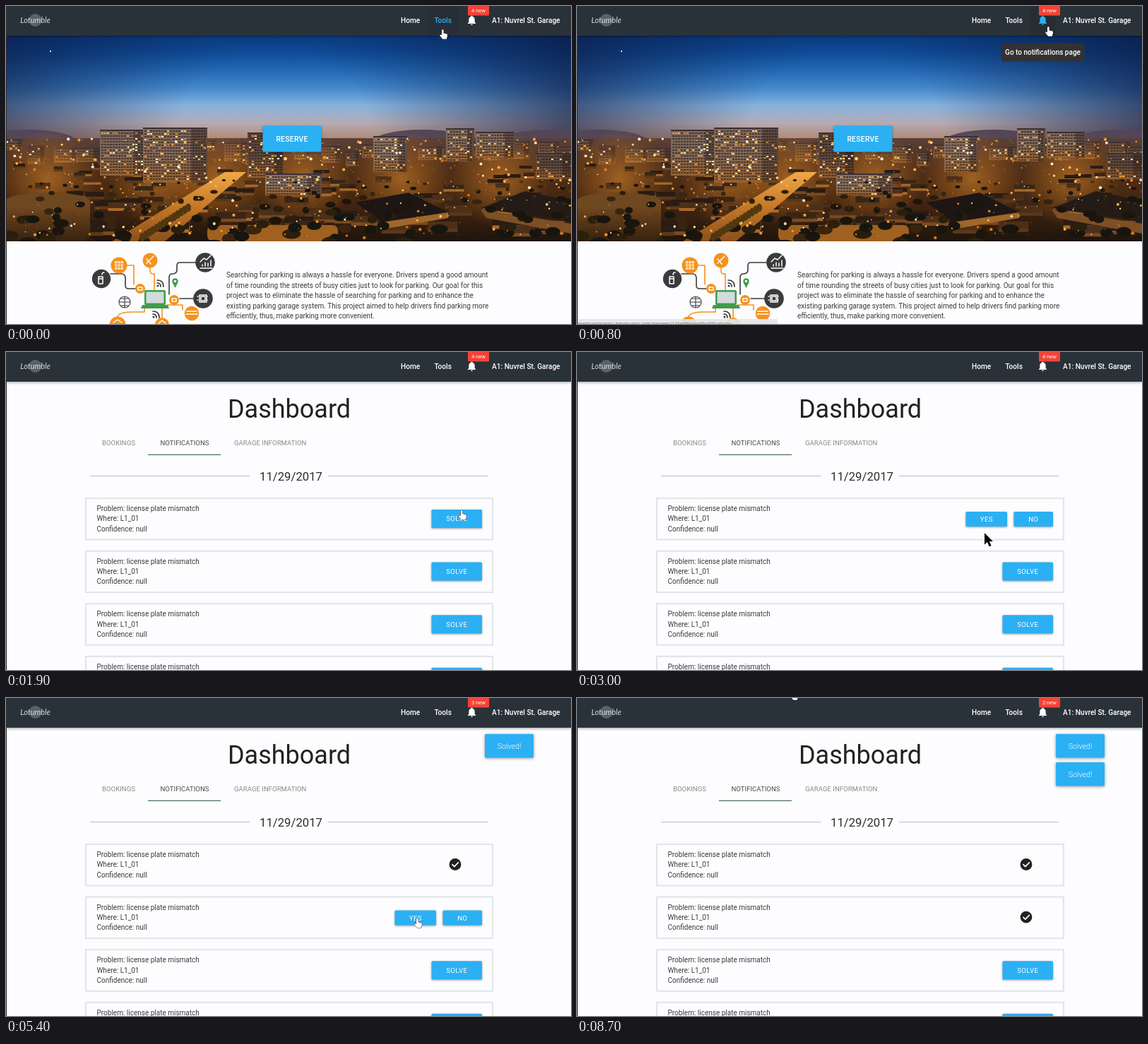
These frames come from a looping animation (800 by 450 pixels, 9.1 s). An HTML page with a canvas:

```html
<!DOCTYPE html>
<html lang="en">
<head>
<meta charset="utf-8">
<title>Parking dashboard</title>
<style>
  html, body { margin: 0; width: 100%; height: 100%; overflow: hidden; }
  canvas { display: block; }
</style>
</head>
<body>
<canvas id="stage" width="800" height="450"></canvas>
<script>
const LOOP = 9100, STEP = 100, PAGE_SWITCH = 1700;
const BLUE = '#2bb0f4', ORANGE = '#f5921e', DARK = '#3b3a3d', GREEN = '#3f9c4a';
const stage = document.getElementById('stage').getContext('2d');
let c = stage;

const clamp = v => Math.max(0, Math.min(1, v));
const ease = v => v * v * (3 - 2 * v);
const mix = (a, b, k) => a + (b - a) * k;

function rect(x, y, w, h, color, radius = 0) {
  c.fillStyle = color;
  c.beginPath();
  c.roundRect(x, y, w, h, radius);
  c.fill();
}

function disc(x, y, r, color, ry = r) {
  c.fillStyle = color;
  c.beginPath();
  c.ellipse(x, y, r, ry, 0, 0, 7);
  c.fill();
}

function poly(points, color) {
  c.fillStyle = color;
  c.fill(new Path2D('M' + points + 'Z'));
}

function stroke(path, color, width = 1.6) {
  c.strokeStyle = color;
  c.lineWidth = width;
  c.lineJoin = c.lineCap = 'round';
  c.stroke(new Path2D(path));
}

function text(s, x, y, size, color, { weight = 400, align = 'left', spacing = 0, family = 'Roboto' } = {}) {
  c.font = `${weight} ${size}px ${family}, sans-serif`;
  c.textAlign = align;
  c.letterSpacing = spacing + 'px';
  c.fillStyle = color;
  c.fillText(s, x, y);
}

function at(x, y, scale, draw) {
  c.save();
  c.translate(x, y);
  c.scale(scale, scale);
  draw();
  c.restore();
}

function shadow(blur, draw) {
  c.save();
  c.shadowColor = 'rgba(0,0,0,.4)';
  c.shadowBlur = blur;
  c.shadowOffsetY = 1;
  draw();
  c.restore();
}

function button(label, x, y, w, h, size = 9.7, weight = 400) {
  shadow(3, () => rect(x, y, w, h, BLUE, 1.5));
  text(label, x + w / 2, y + h / 2 + size * .36, size, '#fff', { align: 'center', spacing: .3, weight });
}

// Evenly spread colour stops
function blend(g, ...colors) {
  colors.forEach((color, i) => g.addColorStop(i / (colors.length - 1), color));
  return g;
}
const vertical = (top, bottom, ...colors) => blend(c.createLinearGradient(0, top, 0, bottom), ...colors);
const radial = (x, y, r0, r1, ...colors) => blend(c.createRadialGradient(x, y, r0, x, y, r1), ...colors);

// Evening skyline: gradients, plain blocks and seeded lights.
function paintCity() {
  let seed = 11;
  const rnd = (a = 0, b = 1) => mix(a, b, (seed = seed * 16807 % 2147483647) / 2147483647);
  const pick = list => list[Math.floor(rnd(0, list.length))];
  const warm = ['#ffd98a', '#ffb64a', '#f59a2c', '#fff0c8', '#d97a1c'];

  function tower(x, w, top, bottom, color) {
    rect(x, top, w, bottom - top, vertical(top, bottom, color, color, '#94602e'));
    rect(x + w * .75, top, w * .25, bottom - top, 'rgba(25,15,20,.35)');
    rect(x, top, w, 2, '#3a3038');
    for (let y = top + 4; y < bottom - 2; y += 4)
      for (let wx = x + 2; wx < x + w - 2; wx += 4)
        rect(wx, y, 3, 2, rnd() < .16 ? pick(warm) : 'rgba(40,28,28,.6)');
  }

  c.save();
  c.beginPath();
  c.rect(0, 42, 800, 291);
  c.clip();

  rect(0, 42, 800, 150, vertical(42, 190, '#0a3c82', '#0f4c98', '#2468b4', '#4488cc', '#86b2de', '#b4abb4', '#b08672'));
  rect(0, 42, 800, 150, radial(380, 200, 140, 500, 'rgba(12,24,62,0)', 'rgba(12,24,62,.85)'));
  rect(62, 63, 2, 2, '#cfe2f7');
  for (const x of [30, 590, 770]) disc(x, 192, 70, '#544659', 17);

  rect(0, 187, 800, 146, vertical(187, 333, '#5a4038', '#50301a', '#4a2a12', '#38200f', '#1e140c'));
  for (let i = 0; i < 24; i++) {
    const top = rnd(189, 206);
    tower(i * 34 + rnd(-6, 6), rnd(18, 36), top, top + rnd(14, 30), pick(['#4a3530', '#5e463a', '#6c4f3c']));
  }
  for (const x of [60, 215, 300, 420, 560, 700]) disc(x, 245, 70, radial(x, 245, 0, 70, 'rgba(255,160,50,.45)', 'rgba(255,140,30,0)'), 70);

  // Low blocks, nearer ones larger
  for (let i = 0; i < 90; i++) {
    const y = 222 + i, w = rnd(10, 20) + i * .35, h = 4 + i * .07, x = rnd(-20, 800);
    rect(x, y, w, h, pick(['#2a1c14', '#3a2616', '#4c2f18']));
    rect(x, y + h, w, 1 + h * .4, pick(['#a8682a', '#7a4a20', '#5c3818']));
  }
  poly('150 333 310 235 340 235 225 333', vertical(235, 333, '#f2a848', '#c57826', '#8a4f1c'));

  const landmarks = [[133, 64, 175, 240], [194, 91, 172, 250], [342, 50, 179, 243], [520, 48, 184, 235],
    [623, 40, 173, 220], [665, 54, 178, 215], [750, 50, 208, 245], [367, 80, 237, 268]];
  landmarks.forEach(([x, w, top, bottom], i) => tower(x, w, top, bottom, ['#7c685b', '#806858', '#5a463c', '#866f60'][i % 4]));

  rect(0, 276, 119, 57, vertical(276, 333, '#7a4c22', '#36220f'));
  disc(59, 276, 60, '#6d4820', 12);
  rect(285, 310, 185, 23, '#a0601f', 8);
  poly('495 278 570 264 626 292 532 306', '#1d1615');
  poly('532 306 626 292 626 300 532 316', '#a0662a');
  poly('672 286 735 262 800 276 800 306', '#241b17');
  poly('672 288 800 308 800 322 680 300', '#7e4f25');

  for (let i = 0; i < 130; i++) {
    const y = rnd(245, 340), size = (y - 225) / 14;
    disc(rnd(0, 800), y, rnd(1, 2) * size, pick(['#1c150c', '#2a1e0c', '#171510', '#382410']), size);
  }
  for (let i = 0; i < 14; i++) disc(193 + i * 5, 327 - i * 3.2, 4, '#51380f', 6);
  for (let i = 0; i < 650; i++) disc(rnd(0, 800), 188 + rnd() ** 1.6 * 140, .4 + rnd() ** 3 * 1.8, pick(warm));
  c.restore();
}

function node(x, y, r, color, icon) {
  disc(x, y, r, color);
  stroke(`M${x} ${y}m${icon}`, '#fff', 1.5);
}

function wifi(x, y) {
  disc(x + 1, y - 1, 1.5, DARK);
  for (const r of [5, 9]) stroke(`M${x} ${y - r}q${r} 0 ${r} ${r}`, DARK, 1.7);
}

function paintDiagram() {
  stroke('M171 367H181V394M204 370V375Q204 379 208 379H210V402', ORANGE);
  stroke('M228 423H250V430M158 440Q160 433 178 433H196V427M221 441V428', ORANGE);
  stroke('M148 379H163Q169 379 169 385V396Q169 400 174 400H183M266 414H246', DARK);
  stroke('M269 363H246Q242 363 242 367V373Q242 379 236 379Q231 379 231 384V408', DARK);

  node(204, 360, 10.5, ORANGE, '-5 4l10 -10m-10 4l6 7');
  node(282, 363, 13.8, DARK, '-7 -1l5 -5l4 2l6 -6m-15 18h17m-14 -3v-2m4 2v-5m4 5v-4m4 4v-8');
  node(135, 386, 13.2, DARK, '-4 -3h6v10h-6zm1 3h4m0 -6q0 -3 3 -3');
  node(279, 414, 13.8, DARK, '-5 -5h10v10h-10zm2 2h6v6h-6zm-5 0h1m-1 5h1m12 -5h1m-1 5h1');
  node(190, 400, 7, ORANGE, '-3 -2h6v4h-6z');
  node(238, 416, 7, ORANGE, '-3 -2h6v4h-6z');
  node(263, 435, 10.3, ORANGE, '-7 -3h14m-15 4h16');
  node(158, 451, 11.5, ORANGE, '-6 -3l6 -4l6 4');
  node(221, 451, 10, ORANGE, '-5 -2l5 -4l5 4');
  disc(160, 367, 11.5, ORANGE);
  for (let i = 0; i < 9; i++) rect(154 + i % 3 * 4.3, 361 + Math.floor(i / 3) * 4.3, 3.3, 3.3, '#ffe3bd');

  stroke('M160 419a8 8 0 1 0 16 0a8 8 0 1 0 -16 0h16m-8 -8v16m-6 -13h12m-12 10h12', DARK, 1.1);
  rect(196, 402, 30, 21, GREEN, 2);
  rect(198.5, 404.5, 25, 16, '#d3dadd');
  poly('193 423 229 423 231 428 191 428', GREEN);
  wifi(214, 397);
  wifi(208, 441);
  poly('235.5 391 239.5 399 243.5 391', GREEN);
  disc(239.5, 389.5, 4.2, GREEN);
  disc(239.5, 389.5, 1.8, '#fff');
}

const INTRO = [
  'Searching for parking is always a hassle for everyone. Drivers spend a good amount',
  'of time rounding the streets of busy cities just to look for parking. Our goal for this',
  'project was to eliminate the hassle of searching for parking and to enhance the',
  'existing parking garage system. This project aimed to help drivers find parking more',
  'efficiently, thus, make parking more convenient.'
];

function paintHome() {
  rect(0, 0, 800, 450, '#fdfcfe');
  paintCity();
  button('RESERVE', 363.5, 169.5, 83, 37, 10.3, 500);
  paintDiagram();
  INTRO.forEach((line, i) => text(line, 312, 384.3 + i * 14.5, 10, '#3c3c3c'));
}

function cached(paint) {
  const layer = document.createElement('canvas');
  layer.width = 800;
  layer.height = 450;
  c = layer.getContext('2d');
  paint();
  c = stage;
  return layer;
}

const home = cached(paintHome);
const ROWS = [{ ask: 2500, done: 3600 }, { ask: 4700, done: 5700 }, {}, {}];
const rowTop = i => 206 + i * 74.6;
const solved = t => ROWS.filter(row => t >= row.done);

function drawCheck(x, y) {
  disc(x, y, 8.4, '#212121');
  stroke(`M${x - 4} ${y + .2}l2.8 2.9l5.6 -5.8`, '#fff', 1.7);
}

function drawRow(row, i, t) {
  const y = rowTop(i);
  c.strokeStyle = '#e0e5e8';
  c.lineWidth = 2;
  c.strokeRect(113, y + 1, 576, 58.5);
  ['Problem: license plate mismatch', 'Where: L1_01', 'Confidence: null']
    .forEach((line, k) => text(line, 128.5, y + 19 + k * 14.4, 10, '#3c3c3c'));
  if (t >= row.done) drawCheck(636, y + 29.5);
  else if (t >= row.ask) {
    button('YES', 550.5, y + 20, 58.5, 21);
    button('NO', 618.5, y + 20, 55.5, 21);
  } else button('SOLVE', 602.5, y + 17, 71.5, 26);
}

function drawToast(row, i, t) {
  const k = ease(clamp((t - row.done + 100) / 300));
  const y = 51 + i * 40 + (1 - k) * 24;
  c.globalAlpha = k;
  shadow(4, () => rect(678, y, 69, 33.5, BLUE, 1.5));
  text('Solved!', 712.5, y + 20.5, 10.7, '#fff', { align: 'center', weight: 300 });
  c.globalAlpha = 1;
}

function drawDashboard(t) {
  rect(0, 0, 800, 450, '#fdfcfe');
  text('Dashboard', 401, 92.5, 36, '#212121', { align: 'center' });
  text('BOOKINGS', 136, 132, 9.6, '#8a8a8a');
  text('NOTIFICATIONS', 218.5, 132, 9.6, '#4a4a4a');
  text('GARAGE INFORMATION', 323, 132, 9.6, '#8a8a8a');
  rect(201, 144.7, 103, 1.4, '#4a7262');
  for (const x of [119, 456]) rect(x, 175, 226, 1, '#b9bcc0');
  text('11/29/2017', 403.5, 182, 16.7, '#2c2c2c', { align: 'center' });
  ROWS.forEach((row, i) => drawRow(row, i, t));
  solved(t).forEach((row, i) => drawToast(row, i, t));
}

const BELL = new Path2D('M12 22c1.1 0 2-.9 2-2h-4c0 1.1.9 2 2 2zm6-6v-5c0-3.1-1.6-5.6-4.5-6.3V4a1.5 1.5 0 0 0-3 0v.7C7.6 5.4 6 7.9 6 11v5l-2 2v1h16v-1z');

function drawNav(t) {
  const onTools = t < 200, onBell = t >= 300 && t < PAGE_SWITCH;
  const link = (s, x, color = '#fff') => text(s, x, 23.7, 10.1, color, { weight: 500 });
  shadow(4, () => rect(0, 0, 800, 42, '#2a3239'));
  if (onTools) rect(597, 0, 44, 42, 'rgba(0,0,0,.07)');
  if (onBell) rect(641, 0, 37, 42, 'rgba(0,0,0,.1)');
  disc(41.5, 20, 9, '#59626a');
  text('Lotumble', 41.5, 24, 11, '#d6dadd', { weight: 'italic 400', align: 'center', family: 'Lato' });
  link('Home', 559);
  link('Tools', 606.5, onTools ? BLUE : '#fff');
  link('A1: Nuvrel St. Garage', 688);
  at(651.1, 11.7, .7, () => {
    c.fillStyle = onBell ? BLUE : '#fff';
    c.fill(BELL);
  });
  rect(654, 0, 30, 13.5, '#f44336', [0, 0, 1.5, 1.5]);
  text(4 - solved(t).length + ' new', 669, 9, 7.6, '#fff', { align: 'center' });
}

// The tooltip slides down while its backdrop grows behind the text.
function drawTooltip(t) {
  const k = clamp((t - 300) / 400);
  const w = mix(70, 117.5, k), h = mix(24, 25.5, k), y = mix(60.5, 65.8, k);
  c.globalAlpha = mix(.1, 1, k) * (k > 0);
  rect(659.7 - w / 2, y - h / 2, w, h, '#323232', 1.5);
  c.globalAlpha = Math.sqrt(k);
  text('Go to notifications page', 659.5, y + 3.5, 10, k < 1 ? '#8ea6c4' : '#fff', { weight: 500, align: 'center' });
  c.globalAlpha = 1;
}

function drawStatus(t) {
  if (t < 300) return;
  const address = 'smartparkingsjsu.herokuapp.com', waiting = t >= 1000;
  rect(0, 443, waiting ? 270 : 284, 7, 'rgba(228,228,230,.88)');
  text(waiting ? `Waiting for ${address}...` : `${address}/garages/1/dashboard#notifications`,
    waiting ? 0 : -2, 451.5, 6.8, '#77777c', { family: 'Open Sans' });
}

// Where the cursor rests, and whether it points at something clickable
const stop = (from, to, x, y, clickable = true) => ({ from, to, x, y, clickable });
const onSolve = (i, from) => stop(from, ROWS[i].ask, 640, rowTop(i) + 21);
const onYes = (i, from) => stop(from, ROWS[i].done + 100, 581, rowTop(i) + 31);
const STOPS = [
  stop(0, 0, 617, 33), stop(400, 900, 666, 29), stop(1300, 1300, 709, 167, false),
  onSolve(0, 2000), stop(3000, 3000, 577, 256, false), onYes(0, 3300),
  onSolve(1, 4400), onYes(1, 5200), stop(6600, 6700, 447, 9, false), stop(8300, LOOP, 305, -11)
];
const ARROW = new Path2D('M0 0V16.5L3.9 13L6.7 19.3L9.6 18L6.8 11.9H12Z');
const HAND = new Path2D('M3 1.3Q4.6-.7 5.6 1.3V5.4L10 6.6Q11.3 7 11 9L9.8 13.8H4.2L.3 8.9Q.3 7 2 7.8L3 8.6Z');

function drawCursor(t) {
  const i = STOPS.findLastIndex(s => s.from <= t);
  const a = STOPS[i], b = STOPS[i + 1] || a;
  const k = t <= a.to ? 0 : ease((t - a.to) / (b.from - a.to));
  const x = mix(a.x, b.x, k), y = mix(a.y, b.y, k);
  const hand = [a, b].some(s => s.clickable && Math.hypot(s.x - x, s.y - y) < 16);
  at(x - (hand ? 3 : 0), y, 1, () => {
    const shape = hand ? HAND : ARROW;
    c.lineJoin = 'round';
    c.lineWidth = hand ? 1 : 1.8;
    c.strokeStyle = hand ? '#222' : '#fff';
    c.fillStyle = hand ? '#fff' : '#000';
    c.stroke(shape);
    c.fill(shape);
  });
}

function frame() {
  const t = Math.floor(performance.now() % LOOP / STEP) * STEP;
  if (t < PAGE_SWITCH) c.drawImage(home, 0, 0);
  else drawDashboard(t);
  drawNav(t);
  if (t < PAGE_SWITCH) {
    drawTooltip(t);
    drawStatus(t);
  }
  rect(0, 42, 1, 408, '#2a2d30');
  drawCursor(t);
  requestAnimationFrame(frame);
}
frame();
</script>
</body>
</html>
```
